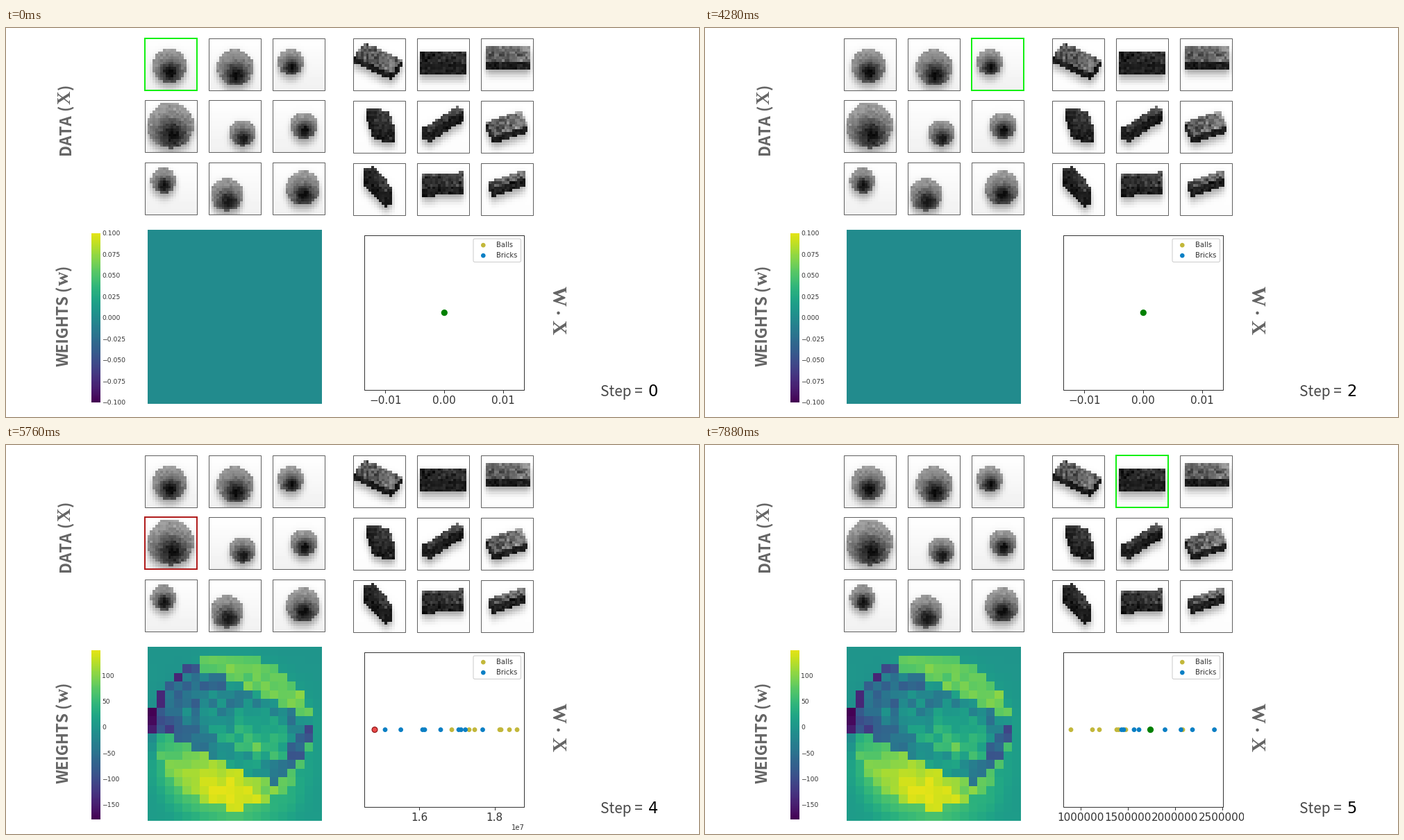
A matplotlib script for the animation above (8000 ms loop, 998 px wide and 561 px high).

```python
import numpy as np
import matplotlib.pyplot as plt
from matplotlib.animation import FuncAnimation
from matplotlib.colors import ListedColormap
from matplotlib.patches import Circle, FancyBboxPatch, Rectangle

W, H, DPI = 998, 561, 64
PX = 72 / DPI                      # points per pixel
FRAME_MS, STEP_MS, LOOP_MS = 160, 1440, 8000

INK, LABEL = "#333333", "#646464"
YELLOW, BLUE = "#c2b73a", "#0a7fc4"
GREEN, RED = "#008000", "#ea4a4a"
SANS, MYRIAD, SERIF = "DejaVu Sans", "Noto Sans CJK JP", "Liberation Serif"

N = 20                             # the pictures are N x N cells
rng = np.random.default_rng(7)
cells = np.arange(N)
X, Y = np.meshgrid(cells + 0.5, cells + 0.5)


# ---------- pictures ----------
def soften(mask, sx, sy, drop=0):
    """Blur a mask and move it down by drop cells."""
    def kernel(s, d):
        return np.exp(-((cells[:, None] - cells - d) / s) ** 2) / (s * np.sqrt(np.pi))
    return kernel(sy, drop) @ mask @ kernel(sx, 0)


def on_ground(mask, body, fade):
    ground = 253 - fade * Y - 75 * soften(mask, 1.4, 2.2, 1.8)
    return np.where(mask, np.clip(body, 50, 215), ground)


def ball(cx, cy, r):
    """A sphere lit from above, darkest low in its middle."""
    dist = np.hypot(X - cx - 0.06 * r, Y - cy - 0.42 * r)
    body = 175 - 122 * np.exp(-2 * (dist / r) ** 2) + rng.normal(0, 7, (N, N))
    return on_ground(np.hypot(X - cx, Y - cy) < r, body, 0.6)


def brick(cx, cy, ux, uy, vx, vy, depth, tone):
    """A top face spanned by u and v, swept down to make the dark side."""
    def face(drop):
        dx, dy = X - cx, Y - cy - drop
        det = ux * vy - uy * vx
        a, b = (dx * vy - dy * vx) / det, (ux * dy - uy * dx) / det
        return (abs(a) < 1) & (abs(b) < 1)

    top = face(0)
    mask = np.any([face(d) for d in np.linspace(0, depth, 12)], axis=0)
    rim = 0.6 * tone * (1 - np.minimum(soften(mask, 0.8, 0.8), 1))
    light = tone * (1 + 0.018 * (X - 9) + rng.normal(0, 0.14, (N, N))) + rim
    dark = 68 + rng.normal(0, 8, (N, N))
    return on_ground(mask, np.where(top, light, dark), 0.1)


balls = [ball(*p) for p in [
    (9.5, 10.4, 6.6), (10.1, 11.1, 7), (7, 9, 5),
    (9.9, 9.7, 8.9), (13, 12.6, 5.1), (12, 9.7, 5.2),
    (7.2, 6.9, 4.9), (7, 12.3, 6.3), (11.7, 9.8, 6.6)]]
bricks = [brick(*p) for p in [
    (9.6, 7.6, 7.3, 3.3, 2.1, -2.7, 2.4, 122),
    (10, 7.3, 9, 0, 0, -2.3, 4.6, 76),
    (10.5, 5.8, 8.5, 0, 0, -2.9, 2.9, 124),
    (10.8, 7.5, 4.3, 0.6, -1.3, -4.2, 4, 80),
    (10.1, 7.1, 6.7, -4.3, -1.3, -0.7, 4, 95),
    (10, 8.9, 6.7, -2.1, -1.5, -2.9, 2.5, 130),
    (9.7, 6, 3.9, 4.1, 1.7, -0.7, 6, 86),
    (10.2, 6.6, 8.2, -0.6, 0, -2.7, 3, 88),
    (10.3, 6.3, 6.5, -2.2, -0.5, -1.3, 3.3, 120)]]

zero = np.zeros((N, N))
first = bricks[0]
second = first - balls[3]

ramp = np.linspace(0, 1, 256)
cmap = ListedColormap(plt.get_cmap("viridis")(0.96 * ramp))


# ---------- stage ----------
fig = plt.figure(figsize=(W / DPI, H / DPI), dpi=DPI, facecolor="white")
ax = fig.add_axes([0, 0, 1, 1])
ax.set_xlim(0, W)
ax.set_ylim(H, 0)
ax.axis("off")


def picture(data, x, y, w, h, **kw):
    return ax.imshow(data, extent=(x, x + w, y + h, y), aspect="auto",
                     interpolation="nearest", zorder=1, **kw)


def text(x, y, s, size, ha="left", color=INK, font=SANS, **kw):
    return ax.text(x, y, s, fontsize=size * PX, ha=ha, va="baseline", color=color,
                   fontfamily=font, zorder=4, **kw)


def frame(x, y, w, h, color, width, z=3):
    return ax.add_patch(Rectangle((x, y), w, h, fill=False, edgecolor=color,
                                  linewidth=width * PX, zorder=z))


def dot(x, y, r, color, edge="none", z=5):
    return ax.add_patch(Circle((x, y), r, facecolor=color, edgecolor=edge,
                               linewidth=1.2 * PX, zorder=z))


def side_label(x, y, s, size, font=MYRIAD, turn=90):
    text(x, y, s, size, color=LABEL, font=font, weight="bold",
         rotation=turn, rotation_mode="anchor")


def tile_corner(kind, k):
    x0, y0 = (200, 14.7) if kind == "ball" else (500.2, 15.4)
    return x0 + 92 * (k % 3), y0 + 89.6 * (k // 3)


for kind, pics in (("ball", balls), ("brick", bricks)):
    for k, pic in enumerate(pics):
        x, y = tile_corner(kind, k)
        picture(pic, x, y, 74.6, 75, cmap="gray", vmin=44, vmax=253)
        frame(x, y, 74.6, 75, "#606060", 1)

for x, y, word, letter, size in ((93, 183, "DATA", "X", 27), (90, 488, "WEIGHTS", "w", 28)):
    close = 89 if letter == "X" else 350
    side_label(x, y, word, 22.5)
    side_label(x, close + 29.5, "(", 22.5)
    side_label(x, close + 21, letter, size, SERIF)
    side_label(x, close, ")", 22.5)
side_label(787, 372, "W", 29, SERIF, -90)
side_label(787, 421, "X", 29, SERIF, -90)
dot(795.5, 411, 2.2, LABEL)

picture(ramp[::-1, None], 123, 295.7, 12.7, 244, cmap=cmap)
frame(516.5, 298.5, 229.5, 223.8, INK, 1)
ax.add_patch(FancyBboxPatch((675, 306), 64.5, 29.5, boxstyle="round,pad=2,rounding_size=2",
                            facecolor="white", edgecolor="#cccccc",
                            linewidth=PX, zorder=3))
for y, name, color in ((313.2, "Balls", YELLOW), (328.2, "Bricks", BLUE)):
    dot(687.3, y, 3.3, color)
    text(706, y + 3, name, 10)
text(856, 531.5, "Step =", 20.8, color="#484848", font=MYRIAD)
# the plot's long tick labels end here
ax.add_patch(Rectangle((776, 524), 14, 24, color="white", linewidth=0, zorder=6))


# ---------- steps ----------
def bar_labels(values, lo, hi, fmt):
    out = []
    for v in values:
        y = 539.7 - 244 * (v - lo) / (hi - lo)
        out.append(text(138.3, y + 3.4, fmt.format(v).replace("-", "\u2212"), 9.3))
    return out


def axis_ticks(x0, gap, labels):
    out = []
    for i, s in enumerate(labels):
        x = x0 + gap * i
        out += ax.plot([x, x], [522.5, 526], color=INK, linewidth=PX, zorder=3)
        out.append(text(x, 541.6, s, 15.3, "center"))
    return out


def scatter(yellow, blue):
    return ([dot(x, 410.6, 3.4, YELLOW) for x in yellow]
            + [dot(x, 410.6, 3.4, BLUE) for x in blue])


def build(step):
    kind, k, right = [("ball", 0, True), ("ball", 1, True), ("ball", 2, True),
                      ("brick", 0, False), ("ball", 3, False), ("brick", 1, True)][step]
    x, y = tile_corner(kind, k)
    out = [frame(x, y, 74.6, 75, "#12f012" if right else "#b01c1c", 2, 4),
           text(924.5, 531, str(step), 22.5, color="black")]

    if step < 3:
        weights, lo, hi = zero, -0.1, 0.1
        out += bar_labels(np.linspace(lo, hi, 9), lo, hi, "{:.3f}")
    elif step == 3:
        weights, lo, hi = first, 57, 253
        out += bar_labels(range(75, 251, 25), lo, hi, "{}")
    else:
        weights, lo, hi = second, -178, 149
        out += bar_labels(range(-150, 101, 50), lo, hi, "{}")
    out.append(picture(weights, 204.2, 291, 250.8, 250.6, cmap=cmap, vmin=lo, vmax=hi))

    if step < 4:
        now = 631.3
        out += axis_ticks(546.3, 85, ["\u22120.01", "0.00", "0.01"])
    elif step == 4:
        now = 531
        out += axis_ticks(595.5, 108.2, ["1.6", "1.8"])
        out.append(text(746.3, 555.4, "1e7", 10, "right"))
        out += scatter([642, 667, 675, 711, 713, 725, 736],
                       [546, 568.6, 600, 603, 626, 652, 655.4, 661.6, 686.5])
    else:
        now = 641.5
        out += axis_ticks(541, 68, [str(v) for v in range(1000000, 2500001, 500000)])
        out += scatter([527, 558, 568, 593, 596, 606, 688],
                       [600, 603, 618, 625, 662.5, 685.5, 702, 733.6])
    if right:
        out.append(dot(now, 410.6, 4.6, GREEN, z=7))
    else:
        out.append(dot(now, 410.6, 3.9, RED, "#8e1616", z=7))
    return out


steps = [build(s) for s in range(6)]


def update(i):
    now = i * FRAME_MS // STEP_MS
    for s, artists in enumerate(steps):
        for a in artists:
            a.set_visible(s == now)
    return []


anim = FuncAnimation(fig, update, frames=LOOP_MS // FRAME_MS, interval=FRAME_MS,
                     init_func=lambda: update(0), repeat=True, repeat_delay=0, blit=False)
plt.show()
```
